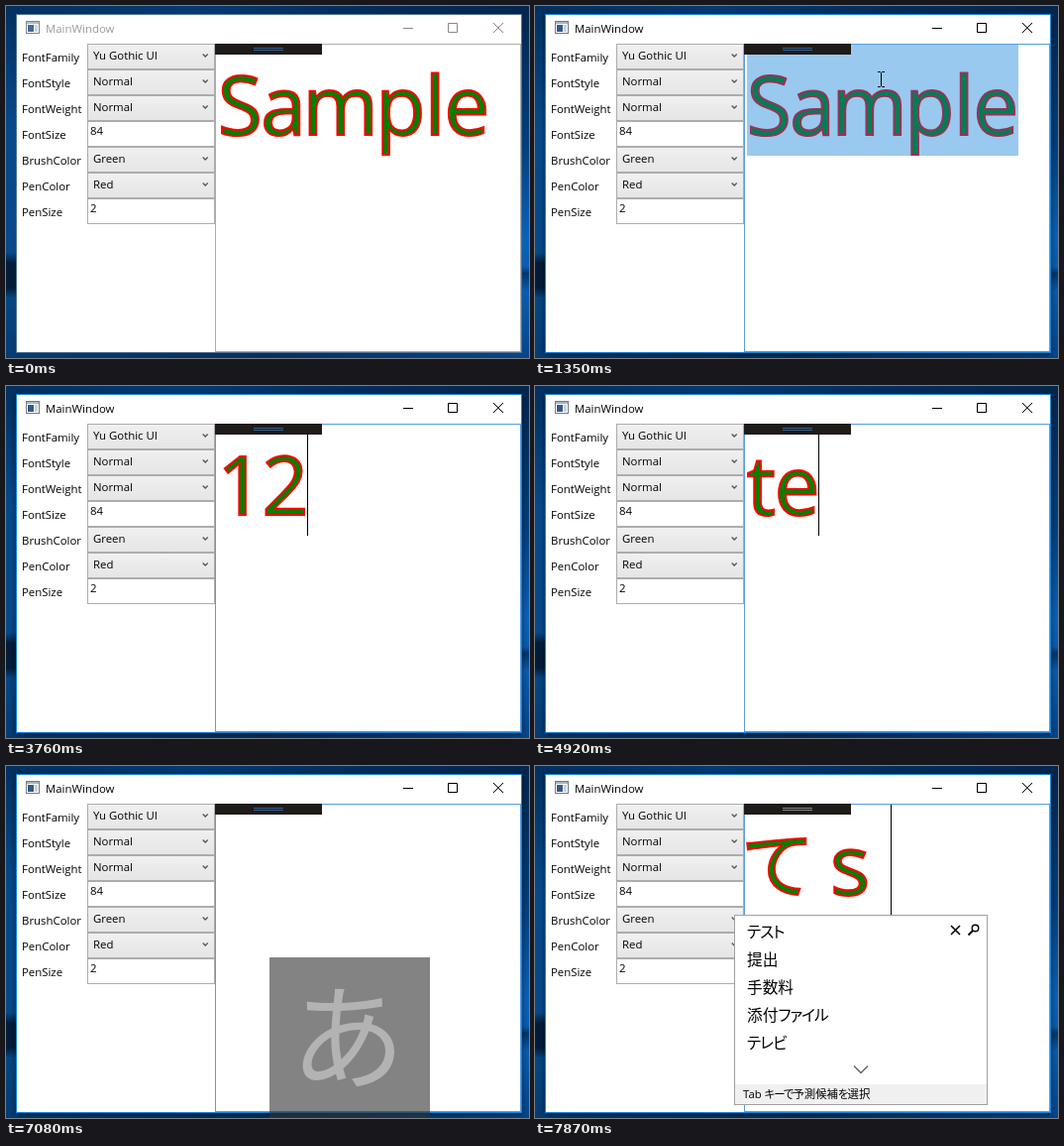
Recreate the animation shown at these times as an HTML page. Size 528 px wide and 355 px high, loop 8 s.

```html
<!DOCTYPE html>
<html lang="en">
<head>
<meta charset="utf-8">
<title>Outlined text editor</title>
<style>
html, body { margin: 0; width: 100%; height: 100%; overflow: hidden; background: #06386f; }
svg { display: block; width: 528px; height: 355px; font: 11.4px "Open Sans", "Noto Sans", sans-serif; }
text { white-space: pre; }
#ink { fill: #008000; stroke: #f00; stroke-width: 2; text-anchor: middle; }
.cjk { font-family: "Open Sans", "Noto Sans CJK JP", "Noto Sans CJK", sans-serif; font-feature-settings: "palt"; }
.kana { letter-spacing: -1px; }
.line { fill: none; stroke: #000; }
</style>
</head>
<body>
<svg id="stage" viewBox="0 0 528 355">
  <defs>
    <linearGradient id="top"><stop offset="0" stop-color="#03305f"/><stop offset=".35" stop-color="#043a72"/><stop offset=".7" stop-color="#032c5a"/><stop offset="1" stop-color="#03264d"/></linearGradient>
    <linearGradient id="left" x2="0" y2="1"><stop offset="0" stop-color="#03305f"/><stop offset=".35" stop-color="#064a8c"/><stop offset=".7" stop-color="#07498a"/><stop offset=".73" stop-color="#021c3a"/><stop offset=".8" stop-color="#021c3a"/><stop offset=".83" stop-color="#064682"/><stop offset="1" stop-color="#053b72"/></linearGradient>
    <linearGradient id="right" x2="0" y2="1"><stop offset="0" stop-color="#03264d"/><stop offset=".4" stop-color="#053f7c"/><stop offset=".66" stop-color="#0a62b8"/><stop offset=".74" stop-color="#0a5cae"/><stop offset=".76" stop-color="#043468"/><stop offset=".81" stop-color="#0a5cae"/><stop offset="1" stop-color="#06458a"/></linearGradient>
    <linearGradient id="bottom"><stop offset="0" stop-color="#053b72"/><stop offset=".5" stop-color="#04315f"/><stop offset="1" stop-color="#06458a"/></linearGradient>
    <linearGradient id="combo" x2="0" y2="1"><stop offset="0" stop-color="#f0f0f0"/><stop offset="1" stop-color="#e5e5e5"/></linearGradient>
    <filter id="soft" x="-5%" y="-5%" width="110%" height="110%"><feGaussianBlur stdDeviation="3"/></filter>
  </defs>

  <rect width="528" height="9" fill="url(#top)"/>
  <rect width="11" height="355" fill="url(#left)"/>
  <rect x="519" width="9" height="355" fill="url(#right)"/>
  <rect x="8" y="348" width="514" height="7" fill="url(#bottom)"/>
  <rect id="shadow" x="10" y="10" width="511" height="342" opacity=".45" filter="url(#soft)"/>

  <rect id="frame" x="10.5" y="8.5" width="510" height="341" fill="#fff"/>
  <g id="icon">
    <rect x="20.5" y="15.5" width="13" height="12" fill="#fff" stroke="#6f7b85"/>
    <rect x="21" y="16" width="12" height="2" fill="#a8b4be"/>
    <rect x="22" y="19" width="6" height="7" fill="#35598c"/>
    <rect x="29" y="19" width="3" height="7" fill="#c9d2da"/>
  </g>
  <text id="title" x="40" y="27">MainWindow</text>
  <path id="buttons" class="line" d="M401 22.5h10M446.500 17.500h9v9h-9zM492 17l10 10M502 17l-10 10"/>
  <g id="form"></g>

  <rect id="box" x="211.5" y="38.5" width="308" height="310" fill="#fff"/>
  <g id="ink"></g>
  <rect id="select" x="214" y="39" width="274" height="112" fill="#0078d7" opacity=".4"/>
  <rect id="caret" y="39" width="1" height="112"/>
  <rect x="211" y="38" width="108" height="11" fill="#1f1b18"/>
  <path id="grip" class="line" d="M250 42.500h30M250 44.500h30"/>

  <g id="popup">
    <rect x="201.500" y="150.500" width="255" height="191" fill="#fff" stroke="#a0a0a0"/>
    <rect x="202" y="321" width="254" height="20" fill="#f0f0f0"/>
    <path class="line" stroke-width="1.500" d="M420 161l9 9M429 161l-9 9"/>
    <circle class="line" cx="444.500" cy="163.500" r="3.300" stroke-width="1.400"/>
    <path class="line" stroke-width="1.800" d="M442 166l-4.500 4.500"/>
    <path class="line" style="stroke:#666" stroke-width="1.500" d="M322 302.500l7 7l7-7"/>
    <g id="list" class="cjk"></g>
    <text class="cjk" x="210" y="335">Tab <tspan class="kana">キーで</tspan>予測候補<tspan class="kana">を</tspan>選択</text>
  </g>
  <g id="mode">
    <rect x="266" y="193" width="162" height="162" fill="#323232"/>
    <text class="cjk" x="345" y="317" font-size="116" text-anchor="middle" fill="#828282">あ</text>
  </g>
  <path id="beam" class="line" d="M-3.500-7.500h2.500l1 1l1-1h2.500M0-6.500v13M-3.500 7.500h2.500l1-1l1 1h2.500"/>
  <path id="arrow" d="M0 0v16l3.700-3.500l2.500 5.700l2.500-1l-2.500-5.600h5z" fill="#fff" stroke="#000"/>
</svg>

<script>
const LOOP = 8000;
const $ = id => document.getElementById(id);

function add(parent, tag, attrs, text = "") {
  const el = document.createElementNS("http://www.w3.org/2000/svg", tag);
  for (const k in attrs) el.setAttribute(k, attrs[k]);
  el.textContent = text;
  parent.append(el);
  return el;
}

// Settings form
const fields = [
  ["FontFamily", "Yu Gothic UI", true],
  ["FontStyle", "Normal", true],
  ["FontWeight", "Normal", true],
  ["FontSize", "84", false],
  ["BrushColor", "Green", true],
  ["PenColor", "Red", true],
  ["PenSize", "2", false],
];
fields.forEach(([label, value, combo], i) => {
  const y = 38 + 26 * i, form = $("form");
  add(form, "text", { x: 16, y: y + 18 }, label);
  add(form, "rect", {
    x: 82.5, y: y + .5, width: 128, height: 25,
    fill: combo ? "url(#combo)" : "#fff", stroke: combo ? "#acacac" : "#abadb3",
  });
  add(form, "text", { x: combo ? 88 : 85, y: y + (combo ? 16 : 14) }, value);
  if (combo) add(form, "path", {
    d: `M198.700 ${y + 10.5}l2.500 2.500l2.500-2.500`, fill: "none", stroke: "#555", "stroke-width": 1.3,
  });
});

// Advance widths in em at 84 px
const advance = {
  S: .531, a: .509, m: .861, p: .588, l: .242, e: .523, t: .339, s: .424,
  1: .539, 2: .539, 3: .539, "ｔ": 1, "ｓ": 1, "て": .738,
};
// Composed glyphs: shown character, size, baseline
const wide = { "ｔ": ["t", 94, 129], "ｓ": ["s", 85, 129.5], "て": ["て", 74, 127] };

const widthOf = s => [...s].reduce((w, c) => w + advance[c] * 84, 0);

function drawInk(s) {
  $("ink").replaceChildren();
  let x = 214;
  for (const c of s) {
    const w = advance[c] * 84;
    const [shown, size, y] = wide[c] || [c, 82, 129.5];
    add($("ink"), "text", { x: x + w / 2, y, "font-size": size, class: shown === "て" ? "cjk" : "" }, shown);
    x += w;
  }
}

const lists = {
  latin: ["type", "true", "☎\uFE0E", "tree", "table"],
  kana: ["テスト", "提出", "手数料", "添付ファイル", "テレビ"],
};

function drawList(name) {
  $("list").replaceChildren();
  (lists[name] || []).forEach((word, i) => {
    const row = add($("list"), "text", {
      x: 214, y: 173 + 28 * i, "font-size": name === "latin" ? 14.7 : 15.7,
    });
    if (word[0] === "☎") row.style.fontFamily = '"DejaVu Sans", sans-serif';
    for (const part of word.match(/[ァ-ヶー]+|[^ァ-ヶー]+/g))
      add(row, "tspan", /[ァ-ヶー]/.test(part) ? { class: "kana" } : {}, part);
  });
}

// Each step changes only what it names
const base = {
  text: "Sample", caret: false, at: null, active: false, focus: false, select: false,
  mouse: null, list: "", mode: 0, grip: "#35618f",
};
const typed = text => ({ text, caret: true, at: null, select: false, mouse: null });
const blink = { caret: false };
const moves = Array.from({ length: 8 }, (_, i) => {
  const k = 1 - (1 - i / 7) ** 2;
  return [Math.round(500 + i * 540 / 7), {
    mouse: [Math.round(522 - 173 * k), Math.round(340 - 266 * k)], active: i >= 4,
  }];
});
const steps = [
  [0, {}],
  ...moves,
  [1280, { focus: true, caret: true, at: 352 }],
  [1350, { select: true, caret: false }],
  [2670, typed("1")],
  [2910, typed("12")],
  [3140, typed("123")],
  [3680, blink],
  [3760, typed("12")],
  [3910, typed("1")],
  [4080, typed("")],
  [4620, blink],
  [4770, typed("t")],
  [4920, typed("te")],
  [5230, typed("tes")],
  [5310, typed("test")],
  [5850, blink],
  [6000, typed("tes")],
  [6150, typed("te")],
  [6300, typed("t")],
  [6380, typed("")],
  [7000, blink],
  [7080, { mode: .6 }],
  [7470, { ...typed("ｔ"), mode: .5, grip: "#8a8a8a" }],
  [7560, { list: "latin", mode: .376 }],
  [7670, { ...typed("て"), mode: .24 }],
  [7740, { list: "kana", mode: .12 }],
  [7800, { mode: 0 }],
  [7870, typed("てｓ")],
];
let last = base;
const states = steps.map(([t, change]) => [t, last = { ...last, ...change }]);

const show = (id, on) => $(id).setAttribute("visibility", on ? "visible" : "hidden");

function draw(s) {
  drawInk(s.text);
  drawList(s.list);
  show("popup", s.list);
  show("select", s.select);
  show("caret", s.caret);
  $("caret").setAttribute("x", s.at ?? Math.floor(214 + widthOf(s.text)));
  show("shadow", s.active);
  $("frame").setAttribute("stroke", s.active ? "#1883d7" : "#56718f");
  $("title").setAttribute("fill", s.active ? "#000" : "#999");
  $("buttons").style.stroke = s.active ? "#000" : "#888";
  $("icon").setAttribute("opacity", s.active ? 1 : .9);
  $("box").setAttribute("stroke", s.focus ? "#569de5" : "#abadb3");
  $("grip").style.stroke = s.grip;
  $("mode").setAttribute("opacity", s.mode);
  const inside = s.mouse && s.mouse[0] < 519 && s.mouse[1] < 348;
  show("beam", s.mouse && inside);
  show("arrow", s.mouse && !inside);
  if (s.mouse) {
    const [x, y] = s.mouse;
    $("beam").setAttribute("transform", `translate(${x + .5} ${y})`);
    $("arrow").setAttribute("transform", `translate(${x + .5} ${y + .5})`);
  }
}

let current = null;
const start = performance.now();
function tick() {
  const t = (performance.now() - start) % LOOP;
  let state = states[0][1];
  for (const [at, s] of states) if (at <= t) state = s;
  if (state !== current) draw(current = state);
  requestAnimationFrame(tick);
}
tick();
</script>
</body>
</html>
```
